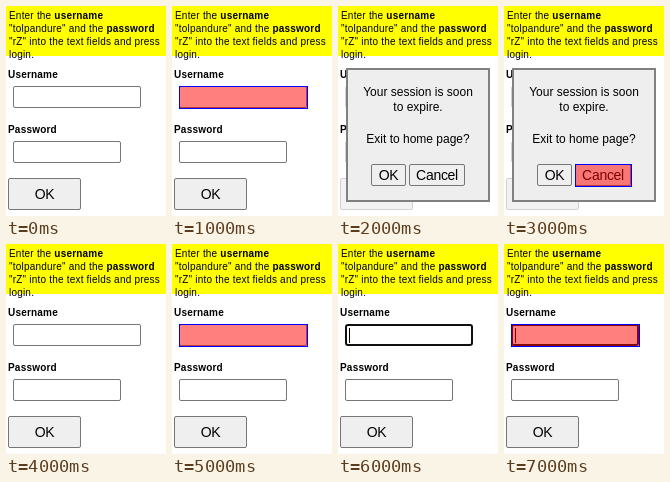
An HTML page for the animation above (8 s loop, 160x210 px).

```html
<!DOCTYPE html>
<html lang="en">
<head>
<meta charset="utf-8">
<title>Login form</title>
<style>
  html, body { margin: 0; width: 100%; height: 100%; overflow: hidden; background: #fff; }
  #stage {
    position: relative; width: 160px; height: 210px; overflow: hidden;
    font: 10px/13px "Liberation Sans", Arial, sans-serif; color: #000;
  }
  #stage div { position: absolute; box-sizing: border-box; white-space: nowrap; }
  [hidden] { display: none; }

  #query { left: 0; top: 0; width: 160px; height: 50px; padding: 3px; background: #ff0; }
  #query, .label { letter-spacing: .2px; }
  .label { left: 2px; font-weight: bold; }
  .field, .button { border: 1px solid #767676; border-radius: 2px; }
  .field { left: 7px; height: 22px; background: #fff; }
  .button {
    background: #efefef; font-size: 14px; line-height: 15px;
    letter-spacing: -.3px; text-align: center;
  }
  .disabled .field { border-color: #d1d1d1; }
  .disabled .button { border-color: #d1d1d1; background: #f2f2f2; }

  #user { top: 80px; width: 128px; }
  #user.focus { border: 2px solid #101010; border-radius: 3px; }
  #caret { left: 11px; top: 84px; width: 1px; height: 15px; background: #000; }
  #password { top: 135px; width: 108px; }
  #login { left: 2px; top: 172px; width: 73px; height: 32px; padding-top: 8px; }

  #dialog { left: 8px; top: 62px; width: 144px; height: 134px; border: 2px solid #808080; background: #eee; }
  #dialog .line { left: 0; width: 140px; font-size: 12px; line-height: 14px; text-align: center; }
  #dialog .button { top: 94px; height: 22px; padding-top: 3px; }

  #marker { border: 1px solid #00f; background: rgba(255, 0, 0, .5); background-clip: padding-box; }
</style>
</head>
<body>
<div id="stage">
  <div id="query">Enter the <b>username</b><br>"tolpandure" and the <b>password</b><br>"rZ" into the text fields and press<br>login.</div>
  <div id="form" style="left:0;top:0">
    <div class="label" style="top:62px">Username</div>
    <div class="field" id="user"></div>
    <div id="caret" hidden></div>
    <div class="label" style="top:117px">Password</div>
    <div class="field" id="password"></div>
    <div class="button" id="login">OK</div>
  </div>
  <div id="dialog" hidden>
    <div class="line" style="top:15px">Your session is soon</div>
    <div class="line" style="top:30px">to expire.</div>
    <div class="line" style="top:62px">Exit to home page?</div>
    <div class="button" style="left:23px;width:35px">OK</div>
    <div class="button" style="left:61px;width:56px">Cancel</div>
  </div>
  <div id="marker" hidden></div>
</div>
<script>
  const byId = id => document.getElementById(id);
  const [form, user, caret, dialog, marker] =
    ["form", "user", "caret", "dialog", "marker"].map(byId);

  const STEP = 1000;
  const userBox = [7, 80, 129, 23];
  const cancelBox = [71, 158, 57, 23];
  const steps = [
    {},
    { mark: userBox },
    { dialog: true },
    { dialog: true, mark: cancelBox },
    {},
    { mark: userBox },
    { focus: true },
    { focus: true, mark: userBox }
  ];

  let shown = -1;

  function show(step) {
    dialog.hidden = !step.dialog;
    form.classList.toggle("disabled", !!step.dialog);
    user.classList.toggle("focus", !!step.focus);
    caret.hidden = !step.focus;
    marker.hidden = !step.mark;
    if (step.mark) {
      const [left, top, width, height] = step.mark.map(v => v + "px");
      Object.assign(marker.style, { left, top, width, height });
    }
  }

  const start = performance.now();

  function tick() {
    const index = Math.floor((performance.now() - start) / STEP) % steps.length;
    if (index !== shown) show(steps[shown = index]);
    requestAnimationFrame(tick);
  }
  tick();
</script>
</body>
</html>
```
